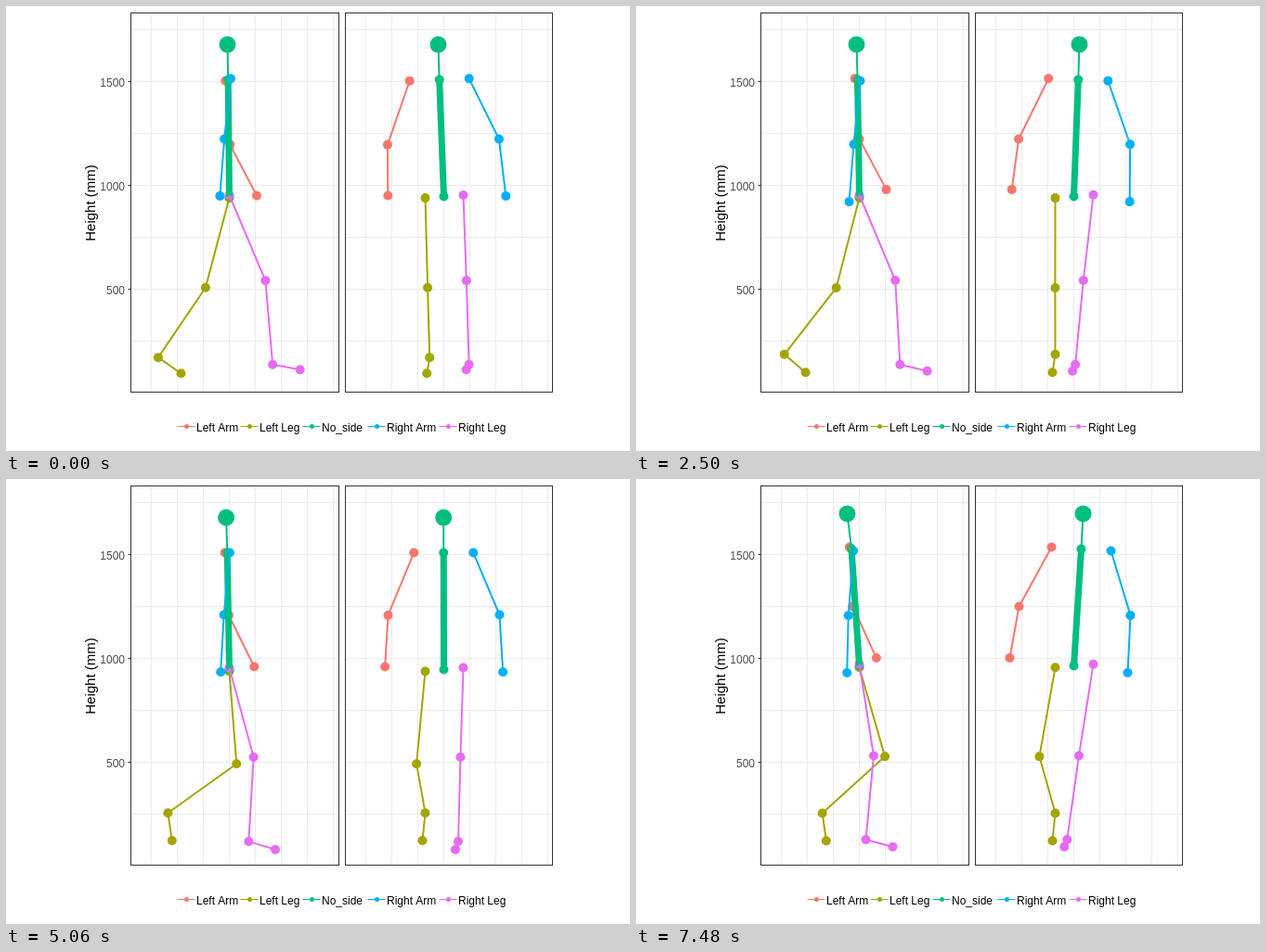
Animation, 672 px wide and 480 px high, one loop 7.5 s. Source, as an HTML page with a canvas:

```html
<!DOCTYPE html>
<html>
<head>
<meta charset="utf-8">
<style>
html, body { margin: 0; width: 672px; height: 480px; overflow: hidden; background: #fff; }
canvas { display: block; }
</style>
</head>
<body>
<canvas id="stage" width="672" height="480"></canvas>
<script>
const g = document.getElementById('stage').getContext('2d');
const FONT = '"Liberation Sans", Arial, sans-serif';
const TAU = Math.PI * 2, LOOP = 7500, STEP = 20;
const LEFT = -1, RIGHT = 1;

// Slow drift of the trunk: time, backward lean, sideways sway of the head.
const drift = [
  [0, -2, -6], [1400, -2, -3], [2500, -3, 6], [3220, -13, 17],
  [4420, -7, 13], [5680, 0, -13], [7480, -13, 10]
];

// Joint angles over one stride in degrees: mean, then cos and sin of each harmonic.
const thighAngle = [8.9, 19.5, -4.6, -4.4, -2.1, -1.1, 2.8];
const shankAngle = [-16.4, 20.3, 14.7, 7.5, -9.9, -2.8, -2.6];
const footPitch = [30, -14.7, -23.2, -15.3, 12.7, 3.7, 7.5];

const wave = (p, peak) => Math.cos(TAU * (p - peak));
const mix = (a, b, k) => a + (b - a) * k;
const clamp = v => Math.max(0, Math.min(1, v));

function angle([mean, ...parts], p) {
  let deg = mean;
  for (let n = 1; n <= 3; n++)
    deg += parts[2 * n - 2] * Math.cos(TAU * n * p) + parts[2 * n - 1] * Math.sin(TAU * n * p);
  return deg * TAU / 360;
}

function driftAt(t) {
  let i = 0;
  while (i < drift.length - 2 && t >= drift[i + 1][0]) i++;
  const a = drift[i], b = drift[i + 1];
  const k = (t - a[0]) / (b[0] - a[0]), ease = k * k * (3 - 2 * k);
  return { lean: mix(a[1], b[1], ease), sway: mix(a[2], b[2], ease) };
}

// Every joint is [side-view x, front-view x, y].
function trunk({ y, lean, sway }) {
  return [
    [240, 471, y],
    [240 + .65 * lean, 471 + .8 * sway, y - 126],
    [240 + lean, 471 + sway, y - 164]
  ];
}

// Extends a joint by a segment of fixed length hanging down.
function hang([x, z, y], dx, dz, length) {
  return [x + dx, z + dz, y + Math.sqrt(length ** 2 - dx ** 2 - dz ** 2)];
}

function arm(side, body) {
  const { p, sway } = body, neck = trunk(body)[1], swing = wave(p, .08);
  const shoulder = [
    neck[0] - side * 3 * wave(p, .6),
    neck[1] + side * 32,
    neck[2] + side * .2 * sway
  ];
  const elbow = hang(shoulder, -1 - side * (2 + 4 * swing), side * 28 - .7 * sway, 73);
  const hand = hang(elbow, 12 - side * (8 + 9 * swing), side * 3.5 - .65 * sway, 62);
  return [shoulder, elbow, hand];
}

function leg(side, body) {
  const q = side === RIGHT ? body.p : body.p + .5;
  const thigh = angle(thighAngle, q), shank = angle(shankAngle, q), foot = angle(footPitch, q);
  const planted = clamp(.5 + 1.5 * Math.sin(TAU * q));
  const inset = planted * (-15 * side - 2.2 * (body.sway - 4));
  const knock = side * 20 * Math.max(0, wave(q, .77)) ** 4;

  const hip = [240, side === RIGHT ? 492 : 451, body.y - 2 * wave(q, .15)];
  const knee = [hip[0] + 100 * Math.sin(thigh), hip[1] + .55 * inset + knock, hip[2] + 100 * Math.cos(thigh)];
  const ankle = [knee[0] + 91 * Math.sin(shank), hip[1] + inset, knee[2] + 91 * Math.cos(shank)];
  const toe = [ankle[0] + 30 * Math.cos(foot), ankle[1] - 3, ankle[2] + 30 * Math.sin(foot)];
  return [hip, knee, ankle, toe];
}

const limbs = [
  { name: 'Left Arm', color: '#F8766D', key: 194, joints: b => arm(LEFT, b) },
  { name: 'Left Leg', color: '#A3A500', key: 262, joints: b => leg(LEFT, b) },
  { name: 'No_side', color: '#00BF7D', key: 329, joints: trunk, spine: true },
  { name: 'Right Arm', color: '#00B0F6', key: 399, joints: b => arm(RIGHT, b) },
  { name: 'Right Leg', color: '#E76BF3', key: 476, joints: b => leg(RIGHT, b) }
];

function bodyAt(t) {
  const s = t / 1000;
  const p = .04 + .797 * s + .004 * s * s; // strides of the right leg, slowly quickening
  return { p, y: 202.5 - .5 * s + 6 * wave(2 * p, .26), ...driftAt(t) };
}

function line(x1, y1, x2, y2, color, width = 1) {
  g.strokeStyle = color;
  g.lineWidth = width;
  g.beginPath();
  g.moveTo(x1, y1);
  g.lineTo(x2, y2);
  g.stroke();
}
function dot(x, y, r, color) {
  g.fillStyle = color;
  g.beginPath();
  g.arc(x, y, r, 0, TAU);
  g.fill();
}
function text(s, x, y, size, color, align) {
  g.font = size + 'px ' + FONT;
  g.fillStyle = color;
  g.textAlign = align;
  g.fillText(s, x, y);
}

function grid(x, width, first) {
  for (let i = 0; i < 8; i++) line(first + 28 * i, 7, first + 28 * i, 416, '#EBEBEB');
  for (let y = 25; y < 416; y += 56) line(x, y, x + width, y, '#EBEBEB');
}

// Dots lie under the lines.
function figure(pose, view) {
  for (const { limb, pts } of pose)
    pts.forEach((p, i) => dot(p[view], p[2], limb.spine && i === 2 ? 9 : 5, limb.color));
  for (const { limb, pts } of pose)
    for (let i = 1; i < pts.length; i++) {
      const a = pts[i - 1], b = pts[i];
      line(a[view], a[2], b[view], b[2], limb.color, limb.spine && i === 1 ? 7 : 2);
    }
}

function draw(t) {
  g.setTransform(1, 0, 0, 1, 0, 0);
  g.fillStyle = '#fff';
  g.fillRect(0, 0, 672, 480);
  g.translate(.5, .5);
  grid(134, 224, 156);
  grid(365, 223, 387);

  const body = bodyAt(t);
  const pose = limbs.map(limb => ({ limb, pts: limb.joints(body) }));
  figure(pose, 0);
  figure(pose, 1);

  g.strokeStyle = '#333';
  g.lineWidth = 1;
  g.strokeRect(134, 7, 224, 409);
  g.strokeRect(365, 7, 223, 409);

  [1500, 1000, 500].forEach((mm, i) => {
    const y = 81 + 112 * i;
    line(131, y, 134, y, '#333');
    text(mm, 127.5, y + 5, 12, '#4D4D4D', 'right');
  });
  g.save();
  g.translate(95, 212);
  g.rotate(-Math.PI / 2);
  text('Height (mm)', 0, 0, 15, '#000', 'center');
  g.restore();

  for (const { name, color, key } of limbs) {
    line(key - 10, 453, key + 9, 453, color);
    dot(key, 453, 2.5, color);
    text(name, key + 10.5, 458, 12, '#000', 'left');
  }
}

function tick() {
  draw(Math.floor(performance.now() % LOOP / STEP) * STEP);
  requestAnimationFrame(tick);
}
tick();
</script>
</body>
</html>
```
